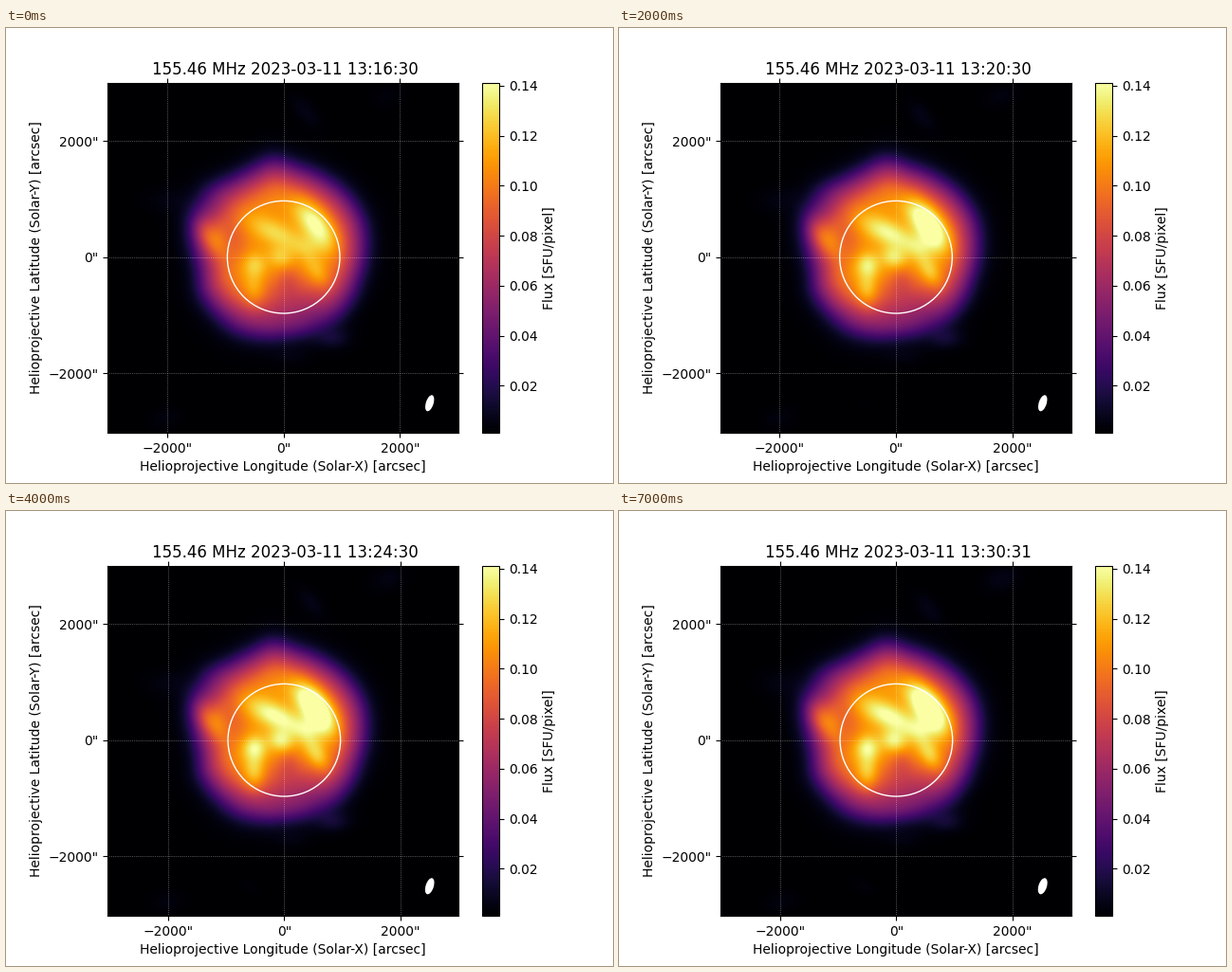
Animation of 640 by 480 pixels, one loop 7500 ms. Source, as a matplotlib script:

```python
import numpy as np
import matplotlib.pyplot as plt
from matplotlib.animation import FuncAnimation
from matplotlib.patches import Circle, Ellipse

FRAMES, INTERVAL = 15, 500
VMIN, VMAX = 0.0011, 0.1412
LEFT, TOP, SIDE = 107.2, 57.6, 369.6   # map area in pixels
SCALE = 2000 / 122.67                  # arcsec per pixel
SUN_Y = 241.7
N = 185

# Pixel coordinates of the map cells, y pointing down
step = (np.arange(N) + 0.5) * SIDE / N
X, Y = np.meshgrid(LEFT + step, TOP + step)


def blob(x, y, long, short, deg=0):
    a = np.radians(deg)
    u = (X - x) * np.cos(a) + (Y - y) * np.sin(a)
    v = (Y - y) * np.cos(a) - (X - x) * np.sin(a)
    return np.exp(-0.5 * ((u / long) ** 2 + (v / short) ** 2))


def corona():
    """Smooth radial falloff inside an uneven outline."""
    ang = [0, 20, 40, 60, 80, 95, 110, 125, 140, 155, 170,
           180, 195, 205, 220, 240, 260, 275, 295, 310, 325, 340]
    rad = [95, 98, 97, 95, 96, 104, 97, 97, 106, 105, 102,
           97, 94, 101, 102, 103, 98, 95, 96, 100, 97, 93]
    deg = np.arange(360)
    edge = np.interp(deg, ang, rad, period=360)
    kernel = np.exp(-0.5 * (np.arange(-15, 16) / 5) ** 2)
    edge = np.convolve(np.r_[edge[-15:], edge, edge[:15]],
                       kernel / kernel.sum(), "valid")
    dx, dy = X - 290, 235 - Y
    theta = np.degrees(np.arctan2(dy, dx)) % 360
    s = np.hypot(dx, dy) / np.interp(theta, deg, edge, period=360)
    # Average the profile over a small window to round its corners
    knots = [0, 0.5, 0.65, 0.72, 0.8, 0.9, 1, 1.08, 1.2, 1.4]
    level = [0.75, 0.75, 0.66, 0.56, 0.45, 0.27, 0.1, 0.035, 0.008, 0]
    return np.mean([np.interp(s + d, knots, level)
                    for d in np.linspace(-0.05, 0.05, 7)], axis=0)


BASE = (corona()
        + 0.17 * blob(213, 220, 16, 9, 55)
        - 0.10 * blob(241, 224, 18, 10, 90)
        - 0.06 * blob(226, 190, 14, 12)
        - 0.17 * blob(305, 282, 28, 13)
        - 0.08 * blob(298, 263, 12, 8, 90)
        - 0.11 * blob(295, 301, 36, 11)
        + 0.07 * blob(345, 328, 12, 7))

BRIGHT = (0.28 * blob(326, 207, 20, 10, 52)
          + 0.16 * blob(283, 216, 21, 9, 25)
          + 0.13 * blob(290, 243, 10, 8, 30)
          + 0.13 * blob(262, 250, 9, 9)
          + 0.11 * blob(262, 275, 14, 8, 90)
          + 0.10 * blob(327, 256, 15, 7, 60)
          + 0.08 * blob(318, 231, 15, 9))


def flux(n):
    gain = np.interp(n, [0, 3, 6, 8, 10, 12, 14],
                     [1, 1.5, 1.2, 1.55, 1.5, 1.3, 1.55])
    t = n / (FRAMES - 1)
    faint = (0.04 * blob(316 + 10 * t, 89 + 14 * t, 14, 7, 50)
             + (0.02 + 0.02 * t) * blob(403, 72, 14, 9, -20)
             + 0.025 * blob(168 + 4 * t, 412, 13, 8, -15)
             + 0.025 * blob(168, 182, 18, 10)
             + 0.02 * t * blob(258, 396, 9, 5, 30)
             + 0.02 * blob(300, 347, 12, 6))
    norm = BASE * (1 + 0.04 * (gain - 1)) + gain * BRIGHT + faint
    return VMIN + np.clip(norm, 0, 1.2) * (VMAX - VMIN)


def sun_x(n):
    """Slow drift to the left with one jump back."""
    return 292.68 - 0.166 * n if n < 8 else 293.33 - 0.16 * (n - 8)


def limits(n):
    x0 = (LEFT - sun_x(n)) * SCALE
    y0 = (SUN_Y - TOP - SIDE) * SCALE
    return x0, x0 + SIDE * SCALE, y0, y0 + SIDE * SCALE


def arcsec(value, _):
    return f"{value:.0f}\"".replace("-", "\u2212")


plt.rcParams["font.family"] = "DejaVu Sans"
fig, ax = plt.subplots(figsize=(6.4, 4.8), dpi=100)
image = ax.imshow(flux(0), cmap="inferno", vmin=VMIN, vmax=VMAX,
                  extent=limits(0), interpolation="bilinear")
fig.colorbar(image, ax=ax, label="Flux [SFU/pixel]")

for axis in (ax.xaxis, ax.yaxis):
    axis.set_ticks([-2000, 0, 2000])
    axis.set_major_formatter(arcsec)
ax.tick_params(top=True, right=True)
ax.grid(color="white", alpha=0.6, linestyle="dotted", linewidth=0.5)
ax.set_xlabel("Helioprojective Longitude (Solar-X) [arcsec]")
ax.set_ylabel("Helioprojective Latitude (Solar-Y) [arcsec]")
title = ax.set_title("", x=0.507, y=1.0)

ax.add_patch(Circle((0, 0), 967, fill=False, color="white", lw=1, zorder=3))
beam = Ellipse((0.9186, 0.085), 0.0215, 0.048, angle=-18, color="white",
               lw=0, transform=ax.transAxes, zorder=3)
ax.add_patch(beam)


def update(n):
    box = limits(n)
    image.set_data(flux(n))
    image.set_extent(box)
    ax.set_xlim(box[:2])
    ax.set_ylim(box[2:])
    beam.set_width(0.0215 + 0.002 * n / (FRAMES - 1))
    second = 30 if n < 12 else 31
    title.set_text(f"155.46 MHz 2023-03-11 13:{16 + n}:{second}")
    return image, beam, title


anim = FuncAnimation(fig, update, frames=FRAMES, interval=INTERVAL,
                     init_func=lambda: update(0), repeat=True, repeat_delay=0)
plt.show()
```
